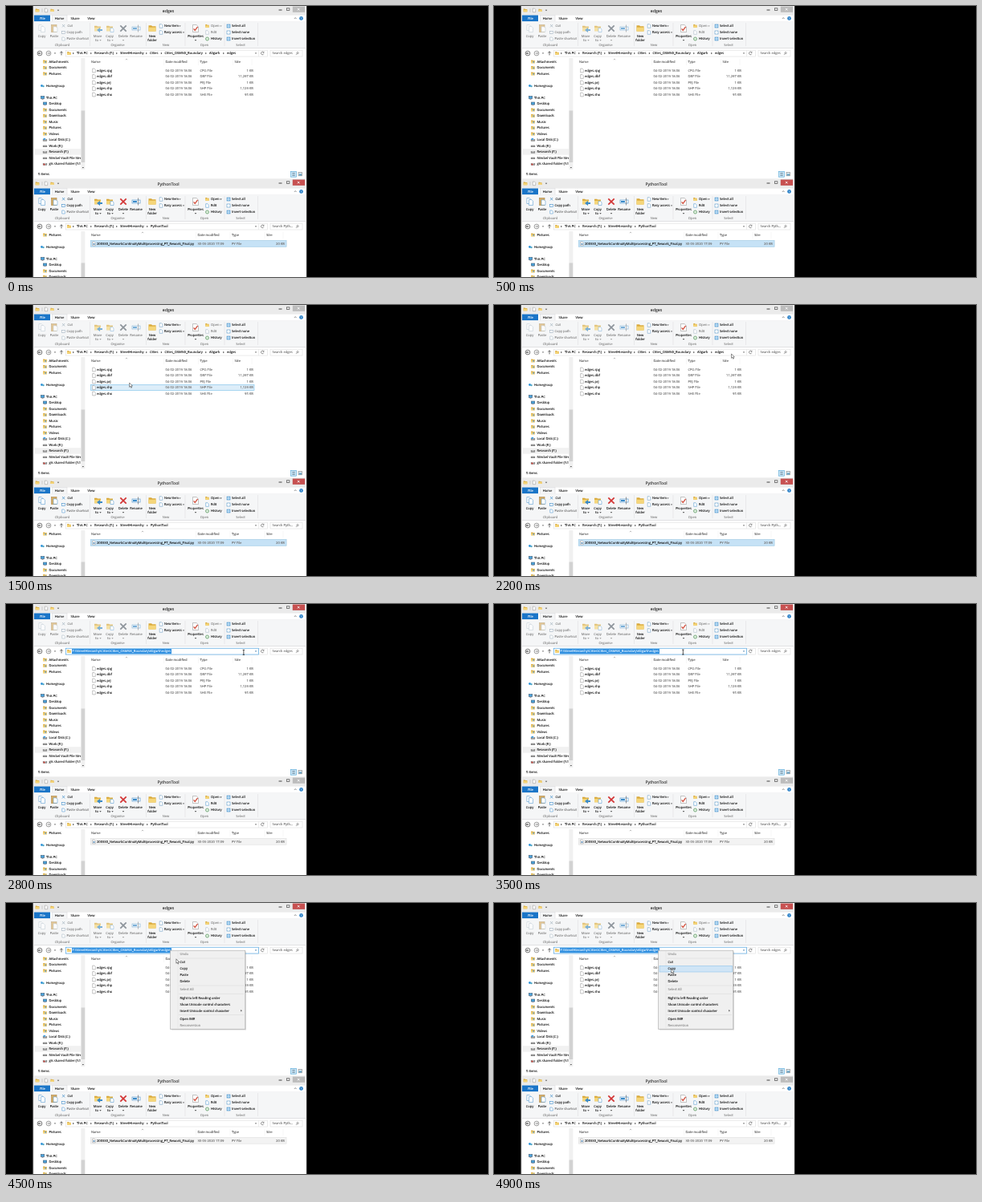
An HTML page for the animation above (5000 ms loop, 600 by 338 pixels).

```html
<!DOCTYPE html>
<html lang="en">
<head>
<meta charset="utf-8">
<title>File manager</title>
<style>
html, body { margin: 0; width: 100%; height: 100%; overflow: hidden; background: #000; }
svg { display: block; width: 100vw; height: 100vh; }
text { font: 4.1px "Open Sans", "Noto Sans", sans-serif; text-rendering: geometricPrecision; white-space: pre; stroke-width: .13px; }
</style>
</head>
<body>
<svg id="stage" viewBox="0 0 600 338"></svg>
<script>
const INK = '#1c1c1c', DIM = '#747474', BLUE = '#1a75c8', FRAME = '#e6e6e6';

const rect = (x, y, w, h, fill, stroke = 'none', extra = '') =>
  `<rect x="${x}" y="${y}" width="${w}" height="${h}" fill="${fill}" stroke="${stroke}" stroke-width=".6" ${extra}/>`;
const line = (d, color, w = .6, fill = 'none') =>
  `<path d="${d}" fill="${fill}" stroke="${color}" stroke-width="${w}"/>`;
const shape = (d, fill) => `<path d="${d}" fill="${fill}"/>`;
const disc = (x, y, r, fill, stroke = 'none') =>
  `<circle cx="${x}" cy="${y}" r="${r}" fill="${fill}" stroke="${stroke}" stroke-width=".7"/>`;
// y is the middle of the line of text
const text = (x, y, s, fill = INK, anchor = 'start', size = 4.1) =>
  `<text x="${x}" y="${y + size * .36}" fill="${fill}" stroke="${fill}" text-anchor="${anchor}" style="font-size:${size}px">${s}</text>`;
const mid = (x, y, s, fill, size) => text(x, y, s, fill, 'middle', size);
const group = (id, body, extra = '') => `<g id="${id}" ${extra}>${body}</g>`;

const down = (x, y, c = '#444') => shape(`M${x - 1.2} ${y - .6}h2.4l-1.2 1.4z`, c);
const right = (x, y, c = '#222') => shape(`M${x - .6} ${y - 1.2}v2.4l1.3 -1.2z`, c);
const folder = (x, y, w = 4.6) =>
  shape(`M${x - w / 2} ${y - w * .42}h${w * .4}l${w * .1} ${w * .12}h${w * .5}v${w * .7}h${-w}z`, '#d9a93a') +
  rect(x - w / 2, y - w * .15, w, w * .55, '#f5d67a');
const page = (x, y, w = 4, h = 5, edge = '#8a8a8a') =>
  line(`M${x - w / 2} ${y - h / 2}h${w * .65}l${w * .35} ${w * .35}v${h - w * .35}h${-w}z`, edge, .5, '#fff');
const drive = (x, y) => rect(x - 2.3, y - .4, 4.6, 1.6, '#a8a8a8', '#6a6a6a') + rect(x - 1.7, y - 1.2, 3.4, .8, '#d5d5d5');
const disk = (x, y) => drive(x, y) + rect(x - 2, y - 2, 2.6, 1.7, '#3a9be0');
const screen = (x, y) => rect(x - 2.2, y - 2, 4.4, 3, '#4aa3dc', '#44617a') + rect(x - 1, y + 1.5, 2, .6, '#667');
const share = (x, y) => drive(x, y) + disc(x - 1, y + .6, 1.1, '#d0473f');
const blob = (x, y) => disc(x - 1, y, 1.4, '#2f93d8') + disc(x + 1, y + .6, 1.2, '#4ea5c4');
const marked = (x, y) => folder(x, y) + rect(x - .2, y - .6, 1.8, 2, '#7ca2b8');

const cross = (x, y, r, c, w) => line(`M${x - r} ${y - r}l${2 * r} ${2 * r}m0 ${-2 * r}l${-2 * r} ${2 * r}`, c, w);

function titleBar(id, title) {
  const close = color => rect(356.8, .6, 15.2, 7.2, color) + cross(364.2, 4.2, 1.3, '#fff', .8);
  return rect(34, 0, 340, 11.5, '#ebebeb') +
    folder(39, 5.4) + page(50, 5.4, 3.4, 4.6) + folder(57.5, 5.4, 4) + down(65, 5.4) +
    line('M45 3.2v4.5', '#999', .4) + mid(202, 6.1, title, '#333', 5.2) +
    line('M339.5 5h4', '#333', .9) + rect(349.3, 2.8, 3.6, 2.8, 'none', '#333') +
    close('#bcbcbc') + group(id, close('#c75050')) +
    rect(35, 11.5, 338, 8, '#fff') + rect(35, 11.5, 20, 7.8, BLUE) +
    rect(57.5, 11.6, 18.5, 8.2, '#f5f6f7', '#dcddde') +
    mid(45.5, 15.5, 'File', '#fff') + mid(66.5, 15.5, 'Home') + mid(86, 15.5, 'Share') + mid(106, 15.5, 'View') +
    line('M358.8 16l1.4 -1.5l1.4 1.5', '#555', .6) + disc(367.5, 15.4, 2.3, '#1c78c4') + mid(367.5, 15.4, '?', '#fff', 3.6);
}

function ribbon(on) {
  const ink = on ? INK : '#858585', blue = on ? '#3c8bc8' : '#9fb0be';
  const big = (x, a, b, c = INK) => mid(x, 37.4, a, c) + (b ? mid(x - 1, 42.6, b, c) : '') + down(x + (b ? 3.5 : 0), 42.8, c);
  const faded = s => `<g opacity="${on ? 1 : .65}">${s}</g>`;
  return rect(35, 19.3, 338, 33.2, '#f5f6f7') + line('M35 52.5h338', '#dadbdc') +
    line('M104.5 21v29M174.5 21v29M223 21v29M272 21v29M313.5 21v29', '#dfe0e1') +
    faded(page(43.4, 27, 5, 7, blue) + page(46, 29, 5, 7, blue)) + mid(44.5, 37.4, 'Copy', ink) +
    faded(rect(56.5, 23.5, 6.5, 9, '#d8ad62', '#a9864b') + page(61.5, 29, 5, 6.5, blue)) + mid(60, 37.4, 'Paste', ink) +
    line('M70 23l3.2 3.4M73.2 23l-3.2 3.4', blue, .7) + text(76.5, 25, 'Cut', ink) +
    rect(69.5, 31.5, 4, 3, '#fff', blue) + text(75.5, 33, 'Copy path', ink) +
    page(71.5, 41, 3.5, 4, blue) + text(75.5, 41, 'Paste shortcut', on ? DIM : ink) +
    faded(folder(114, 28, 8) + shape('M113 30l4 -3v2h3v2h-3v2z', '#3c8bc8') +
      folder(129, 28, 8) + page(132, 30, 4, 5, '#3c8bc8')) +
    big(114, 'Move', 'to', ink) + big(129, 'Copy', 'to', ink) +
    cross(146, 28, 3.7, on ? '#d23535' : '#8d949b', 1.7) + big(146, 'Delete', '', ink) +
    faded(rect(157, 26, 10, 4, '#fff', '#3c8bc8') + rect(158, 27, 5, 2, '#3c8bc8') + line('M164.5 23.5v9', '#555', .6)) +
    mid(162, 37.4, 'Rename', ink) +
    folder(182, 28, 9) + mid(182, 37.4, 'New') + mid(182, 42.6, 'folder') +
    page(193, 25, 3.6, 4.6, '#5b93bd') + text(197, 25, 'New item') + down(216.5, 25) +
    page(193, 33, 3.6, 4.6, '#5b93bd') + text(197, 33, 'Easy access') + down(221, 33) +
    page(236, 28, 7, 9) + line('M233.6 28.4l1.6 2l3.4 -4.6', '#d1503e', 1.3) + big(236, 'Properties', '') +
    folder(250.5, 25, 4.5) + text(255, 25, 'Open', ink) + down(267.5, 25, ink) +
    page(250.5, 33, 3.6, 4.6, blue) + text(255, 33, 'Edit', ink) +
    disc(250.5, 41, 2, '#dff0df', '#4f9156') + text(255, 41, 'History') +
    ['Select all', 'Select none', 'Invert selection'].map((s, i) => {
      const y = 25 + 8 * i;
      return rect(275, y - 2, 4, 4, i === 1 ? '#fff' : '#7fbcea', '#4f93c6') +
        line(`M277 ${y - 2}v4M275 ${y}h4`, '#fff', .5) + text(281, y, s);
    }).join('') +
    [[70, 'Clipboard'], [139, 'Organise'], [199, 'New'], [247, 'Open'], [292, 'Select']]
      .map(([x, s]) => mid(x, 48.7, s, '#8a8a8a')).join('');
}

function addressBar(id, crumbs, search) {
  return rect(35, 53, 338, 12, '#fff') +
    disc(42, 59, 2.9, '#fff', '#444') + line('M43.5 59h-3m1.2 -1.2l-1.2 1.2l1.2 1.2', '#222', .7) +
    disc(53, 59, 2.9, '#fff', '#777') + line('M51.5 59h3m-1.2 -1.2l1.2 1.2l-1.2 1.2', '#777', .7) +
    down(61, 59) + line('M69 61.4v-4.6m-1.7 1.7l1.7 -1.7l1.7 1.7', '#444', .8) +
    rect(74.3, 55.2, 251, 7.8, '#fff', '#dedede') + line('M314.5 55v8', '#e2e2e2') +
    folder(78.5, 59, 4.5) +
    group(id, crumbs.map(([x, s]) => right(x - 4, 59) + text(x, 59, s)).join('')) +
    down(311, 59) + line('M320.8 58a1.8 1.8 0 1 0 .1 1.6M321 56.8v1.4h-1.4', '#555') +
    rect(329, 55.2, 40, 7.8, '#fff', '#dedede') + text(331.5, 59, search, '#777') +
    disc(363, 58.6, 1.1, 'none', '#777') + line('M362.2 59.5l-1.2 1.4', '#777', .7);
}

// Each entry: y, label, icon, and whether it is a root
function navPane(items) {
  return items.map(([y, s, icon, root]) => icon(root ? 45.5 : 48.5, y) + text(root ? 50 : 53.5, y, s)).join('');
}

function header(y, xs, sortX) {
  return ['Name', 'Date modified', 'Type', 'Size'].map((s, i) => text(xs[i], y, s, '#5c5c5c')).join('') +
    line(xs.slice(1).map(x => `M${x - 2} ${y - 4}v8`).join(''), '#efefef', .5) +
    line(`M${sortX - 1.2} ${y - 3}l1.2 -1.1l1.2 1.1`, '#777', .5);
}

const fileRow = (y, xs, name, date, type, size) =>
  page(109.5, y, 3.6, 4.8) + text(113, y, name) + text(xs[1], y, date, DIM) +
  text(xs[2], y, type, DIM) + text(xs[4], y, size, DIM, 'end');

const PLACES = [['Desktop', screen], ['Documents', marked], ['Downloads', marked], ['Music', marked],
  ['Pictures', marked], ['Videos', marked], ['Local Disk (C:)', disk], ['Work (E:)', drive], ['Research (F:)', drive],
  ['Nimbel Vault File Stre', drive], [String.raw`gis shared folder (\\1`, share]];
const tree = (y, n) => [[y, 'Homegroup', blob, 1], [y + 15, 'This PC', screen, 1],
  ...PLACES.slice(0, n).map(([s, icon], i) => [y + 22.5 + 7.5 * i, s, icon])];

const TOP = [106, 198.5, 241.5, 284.5, 308], LOW = [106, 238.5, 281, 324, 347];
const ROW0 = 80.5, PITCH = 7.5;
const FILES = [['cpg', '1 KB'], ['dbf', '11,297 KB'], ['prj', '1 KB'], ['shp', '1,129 KB'], ['shx', '95 KB']];
const BASE = [[88, 'This PC'], [110, 'Research (F:)'], [142, 'StreetHierarchy']];

const upper = rect(33.6, 0, 340.6, 216.5, FRAME) + titleBar('topClose', 'edges') + ribbon(false) +
  addressBar('crumbs', [...BASE, [179, 'Cities'], [197.5, 'Cities_OSMNX_Boundary'], [253, 'Aligarh'], [275, 'edges']], 'Search edges') +
  group('edit', rect(74.3, 55.2, 240, 7.8, '#fff', '#3d9be0') + folder(78.5, 59, 4.5) +
    rect(82, 56, 124, 6.2, '#2f8fe0') +
    text(82.5, 59, String.raw`F:\StreetHierarchy\Cities\Cities_OSMNX_Boundary\Aligarh\edges`, '#e4f2ff') + down(311, 59, '#1c5f96')) +
  rect(35, 65, 338, 150.5, '#fff') + rect(36, 178.2, 61, 7.4, '#f1f1f1') +
  navPane([[69.5, 'Attachments', marked], [77, 'Documents', marked], [84.5, 'Pictures', marked], ...tree(99.5, 11)]) +
  rect(93.2, 65, 12, 140, '#fff') + rect(93.4, 65, 5, 139, '#f0f0f0') + rect(93.6, 130.5, 4.6, 64.5, '#d2d2d2') +
  down(95.9, 201.5) + header(70, TOP, 150) + group('hover', rect(105.3, -3.7, 203.7, 7.3, '#dcedf9', '#7cc2ea')) +
  FILES.map(([e, s], i) => fileRow(ROW0 + PITCH * i, TOP, 'edges.' + e, '04-02-2019 18:06', e.toUpperCase() + ' File', s)).join('') +
  text(40, 210, '5 items') + rect(354.5, 206.4, 7, 6.8, '#cfe8f8', '#4da3d4') +
  line('M356.3 208.3h3.4m-3.4 1.6h3.4m-3.4 1.6h3.4', '#47687c', .6) +
  rect(364, 207.4, 4.6, 4.4, '#dce9f0', '#888') + rect(364.6, 209.6, 3.4, 1.8, '#5a9bc0');

const lower = rect(33.6, .5, 340.6, 122, FRAME) + titleBar('lowClose', 'PythonTool') + ribbon(true) +
  addressBar('lowCrumbs', [...BASE, [180, 'PythonTool']], 'Search Pyth...') +
  rect(35, 65, 338, 60, '#fff') + navPane([[69.5, 'Pictures', marked], ...tree(84.5, 3)]) +
  rect(93.4, 65, 5, 60, '#f0f0f0') + rect(93.6, 104.5, 4.6, 20, '#d2d2d2') +
  header(70, LOW, 170) + rect(105.3, 76.7, 243.7, 7.5, '#f3f3f3', '#dedede') +
  group('picked', rect(105.3, 76.7, 243.7, 7.5, '#c6e2f6', '#9bcdec')) +
  fileRow(80.5, LOW, '200330_NetworkContinuityMultiprocessing_PT_Rework_Final.py', '30-03-2020 17:09', 'PY File', '20 KB') +
  rect(108.6, 80, 1.8, 1.8, '#4f86b5');

const MENU = [[64, 'Undo', 1], [74, 'Cut'], [82, 'Copy'], [90, 'Paste'], [98, 'Delete'], [108, 'Select All', 1],
  [118.5, 'Right to left Reading order'], [126.5, 'Show Unicode control characters'],
  [134.3, 'Insert Unicode control character'], [144.5, 'Open IME'], [152.5, 'Reconversion', 1]];
const menu = rect(206, 60.5, 93, 98, '#000', 'none', 'opacity=".15"') + rect(204.5, 59.2, 93.3, 98, '#f0f0f0', '#a8a8a8') +
  line('M214 60v96.5', '#e2e2e2', .5) + line('M215 69h81M215 103h81M215 113.3h81M215 139.5h81', '#d5d5d5', .5) +
  group('menuHover', rect(206, 78.4, 90.5, 7.6, '#d0e5f6', '#8fc3ea')) +
  MENU.map(([y, s, off]) => text(216.5, y, s, off ? '#8d8d8d' : INK)).join('') + right(293, 134.3);

const $ = id => document.getElementById(id);
$('stage').innerHTML = upper + group('low', lower, 'transform="translate(0 216)"') + group('menu', menu) +
  group('arrow', line('M0 0v5.4l1.2 -1.1l.9 2l.9 -.4l-.9 -1.9h1.7z', '#222', .5, '#fff')) +
  group('beam', line('M-1.2 -3h2.4M0 -3v6M-1.2 3h2.4', '#111', .7));

// Pointer path: time, x, y
const PATH = [[600, 382, 200], [1200, 130, 103], [1400, 130, 103], [2100, 295.5, 61], [3100, 296, 60],
  [3700, 205, 60], [4300, 205, 60], [4750, 220.5, 82]];

function pointer(t) {
  const i = PATH.findIndex(p => p[0] > t);
  if (i < 1) return PATH[i < 0 ? PATH.length - 1 : 0].slice(1);
  const [a, b] = [PATH[i - 1], PATH[i]], k = (t - a[0]) / (b[0] - a[0]);
  return [a[1] + (b[1] - a[1]) * k, a[2] + (b[2] - a[2]) * k];
}

const show = (id, on) => $(id).setAttribute('visibility', on ? 'visible' : 'hidden');
const place = (id, x, y) => $(id).setAttribute('transform', `translate(${x} ${y})`);

function draw(now) {
  const t = Math.floor(now % 5000 / 100) * 100;
  const editing = t >= 2500, open = t >= 3800;
  const [x, y] = pointer(t), [hx, hy] = pointer(t - 50);
  const row = Math.round((hy - ROW0) / PITCH);

  show('topClose', editing);
  show('lowClose', !editing);
  show('crumbs', !editing);
  show('edit', editing);
  show('picked', !editing);
  show('menu', open);
  show('menuHover', t >= 4900);
  show('hover', !editing && row >= 0 && row < FILES.length && hx > 105 && hx < 309);
  place('hover', 0, ROW0 + PITCH * row);
  show('arrow', t >= 600 && (!editing || open));
  show('beam', editing && !open);
  place('arrow', x, y);
  place('beam', x, y);
  requestAnimationFrame(draw);
}
draw(0);
</script>
</body>
</html>
```
